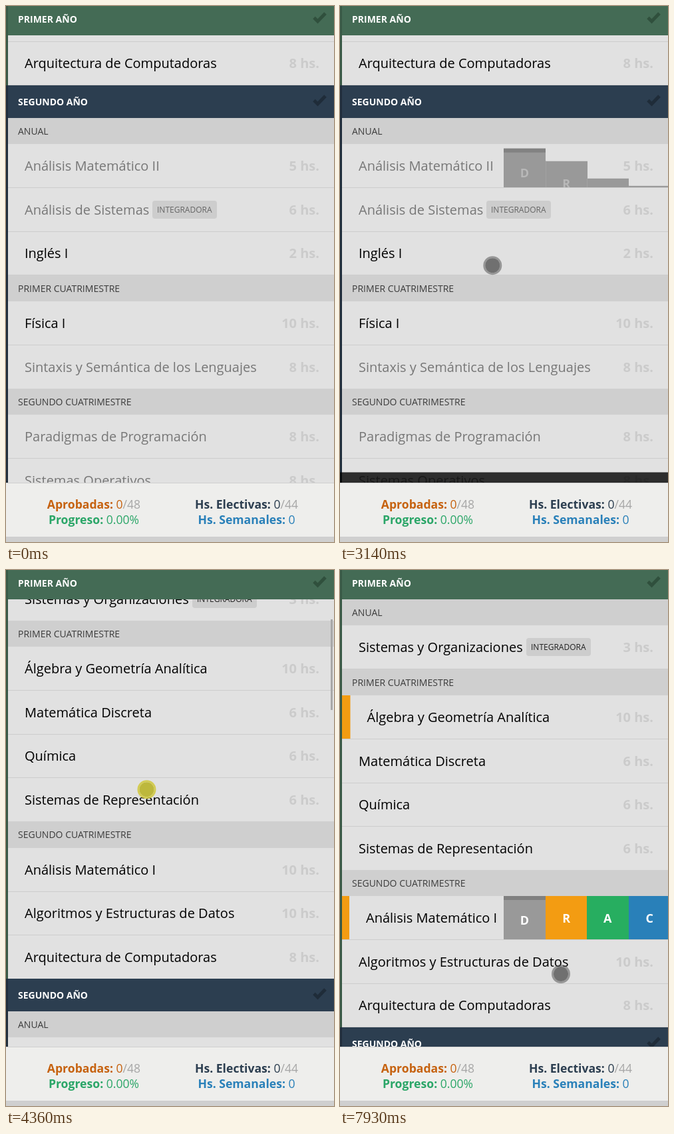
An HTML page with a canvas that plays this animation: 493x804 px, repeating every 7.99 s.

```html
<!DOCTYPE html>
<html lang="es">
<head>
<meta charset="utf-8">
<title>Plan de estudios</title>
<style>
  html, body { margin: 0; width: 100%; height: 100%; overflow: hidden; background: #e1e1e1; }
  canvas { display: block; width: 493px; height: 804px; }
</style>
</head>
<body>
<canvas id="stage"></canvas>
<script>
const LOOP = 7990, W = 493, H = 804, FOOT = 716;
const canvas = document.getElementById('stage');
const ctx = canvas.getContext('2d');
const dpr = window.devicePixelRatio || 1;
canvas.width = W * dpr;
canvas.height = H * dpr;

const year = (name, bg, edge, check) => ({ kind: 'year', name, bg, edge, check, h: 49 });
const term = name => ({ kind: 'term', name, h: 39.3 });
const course = (name, hours, opts = {}) => ({ kind: 'course', name, hours, h: 65.5, ...opts });
const locked = { locked: true };

const items = [
  year('PRIMER AÑO', '#446b55', '#395946', '#30503d'),
  term('ANUAL'),
  course('Sistemas y Organizaciones', 3, { badge: true }),
  term('PRIMER CUATRIMESTRE'),
  course('Álgebra y Geometría Analítica', 10, { open: 5075, close: 6760, mark: 6035 }),
  course('Matemática Discreta', 6),
  course('Química', 6),
  course('Sistemas de Representación', 6),
  term('SEGUNDO CUATRIMESTRE'),
  course('Análisis Matemático I', 10, { open: 6800, close: 9000, mark: 7735 }),
  course('Algoritmos y Estructuras de Datos', 10),
  course('Arquitectura de Computadoras', 8),
  year('SEGUNDO AÑO', '#2c3e50', '#202d3c', '#1f2c39'),
  term('ANUAL'),
  course('Análisis Matemático II', 5, { locked: true, open: 960, close: 2950 }),
  course('Análisis de Sistemas', 6, { locked: true, badge: true }),
  course('Inglés I', 2),
  term('PRIMER CUATRIMESTRE'),
  course('Física I', 10),
  course('Sintaxis y Semántica de los Lenguajes', 8, locked),
  term('SEGUNDO CUATRIMESTRE'),
  course('Paradigmas de Programación', 8, locked),
  course('Sistemas Operativos', 8, locked)
];
items.reduce((y, item) => (item.y = y) + item.h, -5);

const buttons = [
  ['D', '#999999', '#808080'], ['R', '#f39c12', '#c87f0a'],
  ['A', '#27ae60', '#1e8449'], ['C', '#2980b9', '#1f6391']
];

// [time, value...]
const scrollKeys = [
  [3230, -567], [3380, -500], [3550, -405], [3640, -375], [3720, -315], [3830, -245],
  [3950, -212], [4090, -205], [4160, -192], [4280, -120], [4400, -50], [4500, -14], [4640, 0]
];
const pointerKeys = [
  [130, 510, 700], [850, 262, 248], [1300, 262, 248], [1730, 328, 602], [2030, 335, 585],
  [2280, 256, 560], [2500, 279, 556], [2980, 279, 556], [3230, 209, 321], [3640, 209, 513],
  [4090, 210, 197], [4500, 212, 388], [4880, 285, 214], [5600, 285, 214], [5790, 343, 212],
  [6100, 346, 212], [6400, 368, 440], [6510, 367, 476], [6700, 371, 523], [7260, 371, 523],
  [7420, 343, 523], [7620, 340, 525], [7930, 332, 606]
];
const drags = [[3230, 3640, 888], [4090, 4500, 402]];
const taps = [930, 2920, 5030, 5820, 6760, 7480];

const clamp = p => Math.max(0, Math.min(1, p));
const smooth = p => p * p * (3 - 2 * p);
const cubic = p => p < .5 ? 4 * p ** 3 : 1 - 4 * (1 - p) ** 3;
const ramp = (t, start, length, ease = smooth) => ease(clamp((t - start) / length));

function track(keys, t, ease = p => p) {
  if (t <= keys[0][0]) return keys[0].slice(1);
  const i = keys.findIndex(k => k[0] > t);
  if (i < 0) return keys[keys.length - 1].slice(1);
  const a = keys[i - 1], b = keys[i];
  const p = ease((t - a[0]) / (b[0] - a[0]));
  return a.slice(1).map((v, n) => v + (b[n + 1] - v) * p);
}

function rect(x, y, w, h, color) {
  ctx.fillStyle = color;
  ctx.fillRect(x, y, w, h);
}

function circle(x, y, r, color) {
  ctx.fillStyle = color;
  ctx.beginPath();
  ctx.arc(x, y, r, 0, 7);
  ctx.fill();
}

function setFont(size, weight = 400) {
  ctx.font = `${weight} ${size}px "Open Sans", sans-serif`;
}

function text(str, x, y, size, color, weight = 400, align = 'left') {
  setFont(size, weight);
  ctx.fillStyle = color;
  ctx.textAlign = align;
  ctx.fillText(str, x, y);
  return ctx.measureText(str).width;
}

// Runs are [string, color, weight] drawn one after another.
function runs(parts, x, y, size, centered) {
  if (centered) {
    x -= parts.reduce((sum, [str, , weight]) => {
      setFont(size, weight);
      return sum + ctx.measureText(str).width;
    }, 0) / 2;
  }
  for (const [str, color, weight] of parts) x += text(str, x, y, size, color, weight);
}

function clipped(x, y, w, h, draw) {
  ctx.save();
  ctx.beginPath();
  ctx.rect(x, y, w, h);
  ctx.clip();
  draw();
  ctx.restore();
}

function drawYear(item, y) {
  rect(0, y, 3, item.h, item.edge);
  rect(3, y, W, item.h, item.bg);
  text(item.name, 18, y + 30, 14, '#fff', 700);
  ctx.strokeStyle = item.check;
  ctx.lineWidth = 5;
  ctx.beginPath();
  ctx.moveTo(463, y + 22.5);
  ctx.lineTo(468.5, y + 28);
  ctx.lineTo(480, y + 16);
  ctx.stroke();
}

function drawMenu(item, y, t) {
  const picked = item.mark ? ramp(t, item.mark + 250, 120) : 0;
  const press = [1 - picked, picked, 0, 0];
  clipped(246, y, W - 246, 65, () => buttons.forEach(([letter, color, dark], i) => {
    const delay = 40 * (3 - i);
    const rise = ramp(t, item.open + delay, 240, cubic) - ramp(t, item.close + delay, 240, cubic);
    if (rise <= 0) return;
    const x = Math.round(246 + i * 62.6);
    const top = y + 65 * (1 - rise);
    rect(x, top, 63, 65, item.locked ? '#999' : color);
    if (item.locked && i) rect(x, top, 1, 65, '#a2a2a2');
    rect(x, top, 63, 6 * press[i], item.locked ? '#828282' : dark);
    text(letter, x + 31.3, top + 40 + 3 * press[i], 18, item.locked ? '#b8b8b8' : '#fff', 700, 'center');
  }));
}

function drawCourse(item, y, t) {
  const bar = item.mark ? 12.5 * ramp(t, item.mark, 250) : 0;
  rect(3, Math.round(y + item.h) - 1, W, 1, '#cdcdcd');
  rect(3, y, bar, 65, '#f39c12');
  const width = text(item.name, 28 + bar, y + 40, 20, item.locked ? '#777' : '#000');
  if (item.badge) {
    const x = Math.round(28 + width + 5);
    ctx.fillStyle = '#cdcdcd';
    ctx.beginPath();
    ctx.roundRect(x, y + 19, 97, 27, 4);
    ctx.fill();
    text('INTEGRADORA', x + 7, y + 37, 12, item.locked ? '#666' : '#222');
  }
  text(item.hours + ' hs.', 471, y + 40, 20, '#cbcbcb', 700, 'right');
  if (item.open) drawMenu(item, y, t);
}

function drawList(t, scroll) {
  let edge = items[0].edge;
  for (const item of items) {
    const y = Math.round(item.y + scroll);
    if (item.kind === 'year') edge = item.edge;
    if (y > FOOT || y + item.h < 0) continue;
    rect(0, y, 3, item.h + 1, edge);
    if (item.kind === 'year') drawYear(item, y);
    else if (item.kind === 'course') drawCourse(item, y, t);
    else {
      rect(3, y, W, Math.round(item.y + item.h + scroll) - y, '#cfcfcf');
      text(item.name, 18, y + 25, 14, '#3c3c3c');
    }
  }
  drawYear(items[0], -5);
  if (t > 3230 && t < 4970) rect(488, Math.round(61.5 - .169 * scroll), 3, 136, '#a8a8a8');
}

function drawNotice(t) {
  const shown = ramp(t, 1150, 300) - ramp(t, 2930, 250);
  if (shown <= 0) return;
  clipped(0, 463, W, 253, () => {
    ctx.translate(0, 463 + 253 * (1 - shown));
    rect(0, 0, W, 253, 'rgba(0,0,0,.8)');
    runs([['Para cursar ', '#fff', 400], ['Análisis Matemático II', '#fff', 700], [' necesitás:', '#fff', 400]], 15, 37, 18);
    text('Regular:', 33, 70, 18, '#f39c12', 700);
    [['Análisis Matemático I', 100], ['Álgebra y Geometría Analítica', 124]].forEach(([name, y]) => {
      circle(49, y - 6, 2.8, '#fff');
      const width = text(name, 65, y, 18, '#fff');
      circle(65 + width + 14.5, y - 6, 6.5, '#aaa');
    });
    text('Aprobadas:', 33, 166, 18, '#27ae60', 700);
    circle(49, 189, 2.8, '#aaa');
    text('Ninguna.', 65, 195, 18, '#aaa');
    text('CLICK O TAP PARA CERRAR', 478.5, 231, 12.6, '#aaa', 400, 'right');
  });
}

function drawFooter() {
  const stat = (label, value, total, color, x, y) =>
    runs([[label + ' ', color, 700], [value, color, 400], [total, '#a6a6a6', 400]], x, y, 17.6, true);
  rect(0, FOOT - 1, W, 1, '#cfcfcf');
  rect(0, FOOT, W, 80, '#eeeeec');
  rect(0, 796, W, 8, '#cfcfcf');
  stat('Aprobadas:', '0', '/48', '#c6620f', 132, 754);
  stat('Progreso:', '0.00%', '', '#2ba668', 132, 777);
  stat('Hs. Electivas:', '0', '/44', '#2c3e50', 361.5, 754);
  stat('Hs. Semanales:', '0', '', '#2980b9', 361.5, 777);
}

function drawPointer(t, scroll) {
  if (t < 130) return;
  let [x, y] = track(pointerKeys, t, smooth);
  const drag = drags.find(([from, to]) => t >= from && t <= to);
  if (drag) y = drag[2] + scroll;
  const pressed = drag || taps.some(tap => t >= tap && t < tap + 80);
  circle(x, y, 11, pressed ? 'rgba(186,180,46,.92)' : 'rgba(0,0,0,.5)');
  ctx.strokeStyle = pressed ? 'rgba(208,200,64,.88)' : 'rgba(75,75,75,.5)';
  ctx.lineWidth = 3;
  ctx.beginPath();
  ctx.arc(x, y, 12.5, 0, 7);
  ctx.stroke();
}

function frame(now) {
  const t = now % LOOP;
  const [scroll] = track(scrollKeys, t);
  ctx.setTransform(dpr, 0, 0, dpr, 0, 0);
  rect(0, 0, W, H, '#e1e1e1');
  drawList(t, scroll);
  drawNotice(t);
  drawFooter();
  drawPointer(t, scroll);
}

const start = performance.now();
function tick() {
  frame(performance.now() - start);
  requestAnimationFrame(tick);
}
tick();
</script>
</body>
</html>
```
